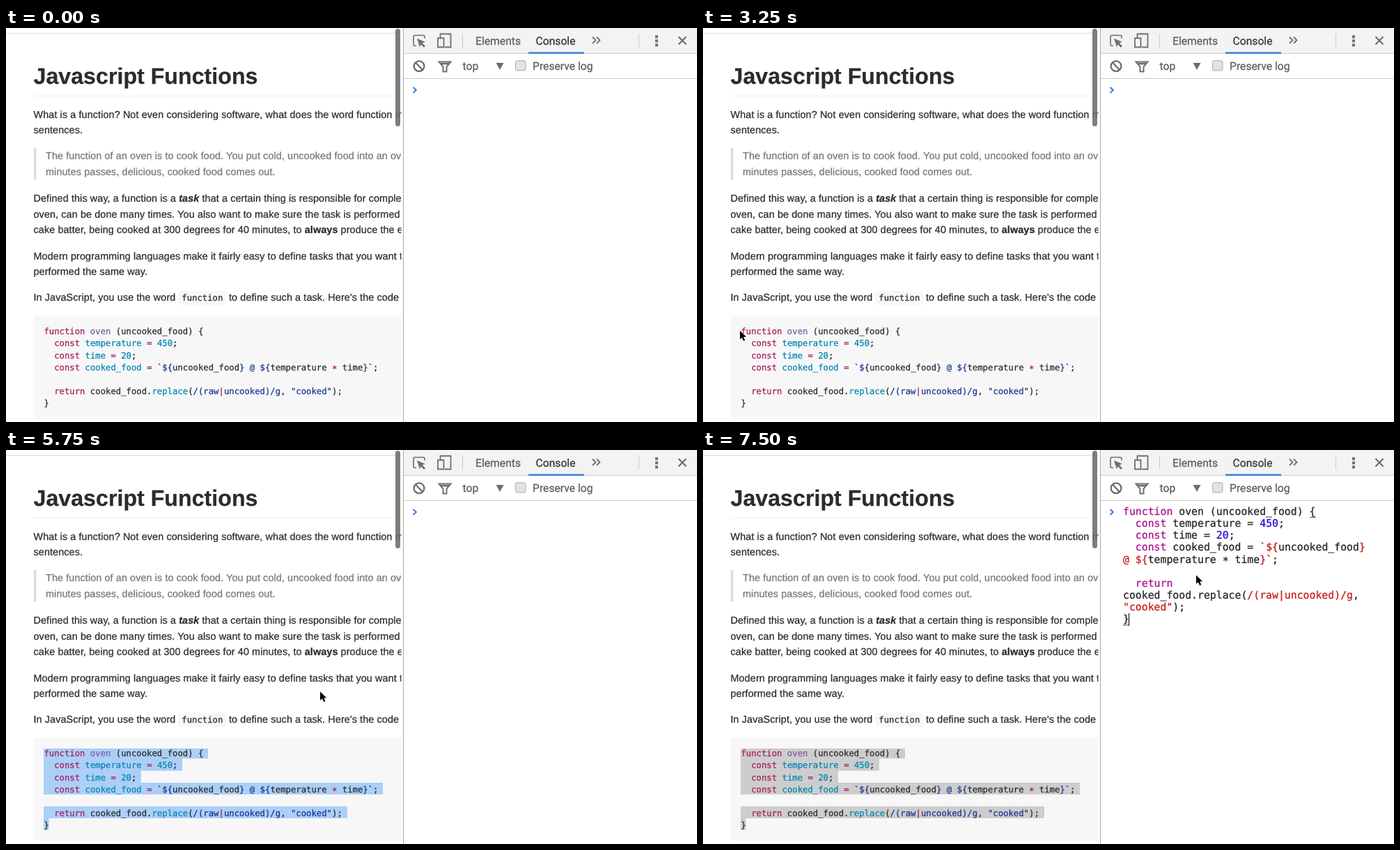
These frames come from a looping animation (992 by 565 pixels, 8 s). An HTML page:

```html
<!DOCTYPE html>
<html lang="en">
<head>
<meta charset="utf-8">
<title>Javascript Functions</title>
<style>
html, body { margin: 0; width: 100%; height: 100%; overflow: hidden; background: #fff; }
svg { display: block; width: 992px; height: 565px; }
/* the thin outline gives the type its heavier screen weight */
text, tspan { fill: currentColor; stroke: currentColor; stroke-width: .25; }
text { white-space: pre; text-rendering: geometricPrecision; }

.page { font: 14.4px "Liberation Sans", Arial, sans-serif; letter-spacing: .1px; color: #2b2b2b; }
.page .title { font-size: 32.2px; font-weight: bold; letter-spacing: 0; }
.page .quote { color: #777; }
.b { font-weight: bold; }
.em { font-style: italic; }
.page .code { font: 12.27px "DejaVu Sans Mono", monospace; letter-spacing: 0; }
.code .k { color: #a71d5d; }
.code .f { color: #795da3; }
.code .v { color: #0086b3; }
.code .s { color: #183691; }

.tools { font: 15.7px Roboto, Arial, sans-serif; color: #5a5a5a; }
.tools .on { color: #333; }
.icons { fill: none; stroke: #6e6e6e; stroke-width: 2; }
.icons .solid { fill: #6e6e6e; stroke: none; }
.console { font: 14.82px "DejaVu Sans Mono", monospace; color: #222; }
.console .k { color: #aa0d91; }
.console .n { color: #1c00cf; }
.console .s { color: #c41a16; }

/* every change is a hard cut on a quarter-second grid */
.anim { animation: 8s step-end infinite; }
#sel { animation-name: blur; }
#sel1 { animation-name: sel1; }
#sel2 { animation-name: sel2; }
#sel3 { animation-name: sel3; }
#sel4 { animation-name: sel4; }
#caret { animation-name: blink; }
#pasted { animation-name: paste; }
#pointer { animation-name: move; }

@keyframes blur { 0% { fill: #accff7; } 81.25%, 100% { fill: #cdcdcd; } }
@keyframes sel1 { 0% { opacity: 0; } 46.875%, 100% { opacity: 1; } }
@keyframes sel2 { 0% { opacity: 0; } 50%, 100% { opacity: 1; } }
@keyframes sel3 { 0% { opacity: 0; } 53.125%, 100% { opacity: 1; } }
@keyframes sel4 { 0% { opacity: 0; } 56.25%, 100% { opacity: 1; } }
@keyframes paste { 0% { opacity: 0; } 90.625%, 100% { opacity: 1; } }
@keyframes blink {
  0%, 40.625%, 90.625%, 100% { opacity: 0; }
  34.375%, 84.375% { opacity: 1; }
}
@keyframes move {
  0% { opacity: 0; transform: translate(321px, 311px); }
  9.375% { opacity: 1; transform: translate(321px, 311px); }
  12.5% { opacity: 1; transform: translate(292px, 322px); }
  15.625% { opacity: 1; transform: translate(27px, 397px); }
  18.75% { opacity: 1; transform: translate(38px, 422px); }
  21.875% { opacity: 1; transform: translate(47px, 432px); }
  25% { opacity: 1; transform: translate(53px, 434px); }
  46.875% { opacity: 1; transform: translate(64px, 462px); }
  50% { opacity: 1; transform: translate(75px, 492px); }
  53.125% { opacity: 1; transform: translate(81px, 524px); }
  56.25% { opacity: 1; transform: translate(85px, 535px); }
  59.375% { opacity: 1; transform: translate(86.5px, 538px); }
  71.875% { opacity: 1; transform: translate(451px, 346.5px); }
  75% { opacity: 1; transform: translate(588.5px, 248px); }
  78.125%, 100% { opacity: 1; transform: translate(708px, 179.5px); }
}
</style>
</head>
<body>
<svg viewBox="0 0 992 565">
  <defs><clipPath id="pane"><path d="M0 0H567.5V565H0Z"/></clipPath></defs>

  <!-- article -->
  <g class="page" clip-path="url(#pane)">
    <path d="M0 7.5H568" stroke="#ddd"/>
    <text class="title" x="39.5" y="80">Javascript Functions</text>
    <path d="M40 97.5H568" stroke="#eee"/>
    <text x="39.5" y="128.7">What is a function? Not even considering software, what does the word function m</text>
    <text x="39.5" y="151.4">sentences.</text>

    <path d="M40 172h3.5v45.5h-3.5z" fill="#ddd"/>
    <text class="quote" x="57" y="188.2">The function of an oven is to cook food. You put cold, uncooked food into an oven</text>
    <text class="quote" x="57" y="211">minutes passes, delicious, cooked food comes out.</text>

    <text x="39.5" y="248.8">Defined this way, a function is a <tspan class="b em">task</tspan> that a certain thing is responsible for complet</text>
    <text x="39.5" y="271.6">oven, can be done many times. You also want to make sure the task is performed</text>
    <text x="39.5" y="294.4">cake batter, being cooked at 300 degrees for 40 minutes, to <tspan class="b">always</tspan> produce the e</text>
    <text x="39.5" y="331.7">Modern programming languages make it fairly easy to define tasks that you want t</text>
    <text x="39.5" y="354.4">performed the same way.</text>

    <rect x="247" y="377" width="69" height="20" rx="3" fill="#f7f7f7"/>
    <text x="39.5" y="391.4">In JavaScript, you use the word</text>
    <text class="code" x="252.3" y="391.3">function</text>
    <text x="320" y="391.4">to define such a task. Here's the code</text>

    <rect x="40" y="412.5" width="540" height="148" rx="3" fill="#f7f7f7"/>
    <g id="sel" class="anim" fill="#accff7">
      <path id="sel1" class="anim" d="M54 428H290V442.5H62V460H54Z"/>
      <path id="sel2" class="anim" d="M54 442H253V460H194V477H76.5V494H54Z"/>
      <path id="sel3" class="anim" d="M54 477H541V494H54ZM54 511H76.5V528H54Z"/>
      <path id="sel4" class="anim" d="M54 511H490V528H61.5V545H54Z"/>
    </g>
    <g class="code">
      <text x="54.4" y="439.3"><tspan class="k">function</tspan> <tspan class="f">oven</tspan> (uncooked_food) {</text>
      <text x="54.4" y="456.4">  <tspan class="k">const</tspan> <tspan class="v">temperature</tspan> <tspan class="k">=</tspan> <tspan class="v">450</tspan>;</text>
      <text x="54.4" y="473.5">  <tspan class="k">const</tspan> <tspan class="v">time</tspan> <tspan class="k">=</tspan> <tspan class="v">20</tspan>;</text>
      <text x="54.4" y="490.6">  <tspan class="k">const</tspan> <tspan class="v">cooked_food</tspan> <tspan class="k">=</tspan> <tspan class="s">`${</tspan>uncooked_food<tspan class="s">} @ ${</tspan>temperature <tspan class="k" dy="2">*</tspan><tspan dy="-2"> time</tspan><tspan class="s">}`</tspan>;</text>
      <text x="54.4" y="524.8">  <tspan class="k">return</tspan> cooked_food.<tspan class="v">replace</tspan>(<tspan class="s">/(raw</tspan><tspan class="k">|</tspan><tspan class="s">uncooked)/g</tspan>, <tspan class="s">"cooked"</tspan>);</text>
      <text x="54.4" y="541.9">}</text>
    </g>
    <rect x="559" y="1" width="7" height="140" rx="3.5" fill="#6f6f6f" opacity=".9"/>
  </g>

  <!-- developer tools -->
  <path d="M571 0H992V36H571Z" fill="#f3f3f3"/>
  <path d="M571 36.5H992M571 72.5H992M655.5 8V28M908.5 8V28" stroke="#ccc"/>
  <path d="M570.5 0V565" stroke="#a9a9a9"/>
  <path d="M750 34.5H830V37H750Z" fill="#3b82d8"/>
  <g class="tools">
    <text x="674" y="23.5">Elements</text>
    <text class="on" x="760.5" y="23.5">Console</text>
    <text x="655.5" y="60">top</text>
    <text x="756" y="60">Preserve log</text>
  </g>
  <g class="icons">
    <path d="M589 25.5H587Q585 25.5 585 23.5V12.5Q585 10.5 587 10.5H599Q601 10.5 601 12.5V15" stroke-width="1.6"/>
    <path class="solid" d="M590 15L602 20 597.6 21.6 602 26 600 28 595.6 23.6 594 27.5Z"/>
    <path d="M623.5 14V8.5H638.5V27.5H630M620 14.5H628.5V27.5H620Z" stroke-width="1.8"/>
    <path d="M842 13L846.5 17.5 842 22M848 13L852.5 17.5 848 22" stroke-width="1.8"/>
    <path class="solid" d="M932 10.5h4v4h-4zM932 16.5h4v4h-4zM932 22.5h4v4h-4z"/>
    <path d="M965.5 12.5L976.5 23.5M976.5 12.5L965.5 23.5" stroke-width="2.2"/>
    <circle cx="593" cy="54.7" r="7.4" stroke-width="2.3"/>
    <path d="M588 49.5L598 60" stroke-width="2.3"/>
    <path d="M621.5 48.5H638.5L632.5 55.5V62.5H627.5V55.5Z"/>
    <path d="M623 50H637L635 52.5H625Z" class="solid"/>
    <path class="solid" d="M703.5 50H714.5L709 60Z"/>
    <rect x="731.5" y="46.8" width="14.5" height="14.2" rx="2.5" fill="#e2e2e2" stroke="#aaa" stroke-width="1"/>
    <path d="M584.5 85L588.8 89 584.5 93" stroke="#367cd8"/>
  </g>

  <path id="caret" class="anim" d="M603 79h1v18h-1z" fill="#222"/>
  <g id="pasted" class="anim console">
    <text x="603" y="93"><tspan class="k">function</tspan> oven (uncooked_food) {</text>
    <text x="603" y="110.1">  <tspan class="k">const</tspan> temperature = <tspan class="n">450</tspan>;</text>
    <text x="603" y="127.2">  <tspan class="k">const</tspan> time = <tspan class="n">20</tspan>;</text>
    <text x="603" y="144.3">  <tspan class="k">const</tspan> cooked_food = <tspan class="s">`${</tspan>uncooked_food<tspan class="s">}</tspan></text>
    <text x="603" y="161.5"><tspan class="s">@ ${</tspan>temperature <tspan dy="2">*</tspan><tspan dy="-2"> time</tspan><tspan class="s">}`</tspan>;</text>
    <text x="603" y="195.7">  <tspan class="k">return</tspan></text>
    <text x="603" y="212.8">cooked_food.replace(<tspan class="s">/(raw|uncooked)/g</tspan>,</text>
    <text x="603" y="229.9"><tspan class="s">"cooked"</tspan>);</text>
    <text x="603" y="247">}</text>
    <path d="M871 96.5h9M603 251h9" stroke="#444"/>
    <path d="M611 234h1v18h-1z"/>
  </g>

  <path id="pointer" class="anim" d="M0 0V12.6L2.9 9.9 5.1 14.7 7.3 13.7 5.2 9.1H9.2Z" fill="#000" stroke="#fff" stroke-width="1.6" paint-order="stroke"/>
</svg>
</body>
</html>
```
